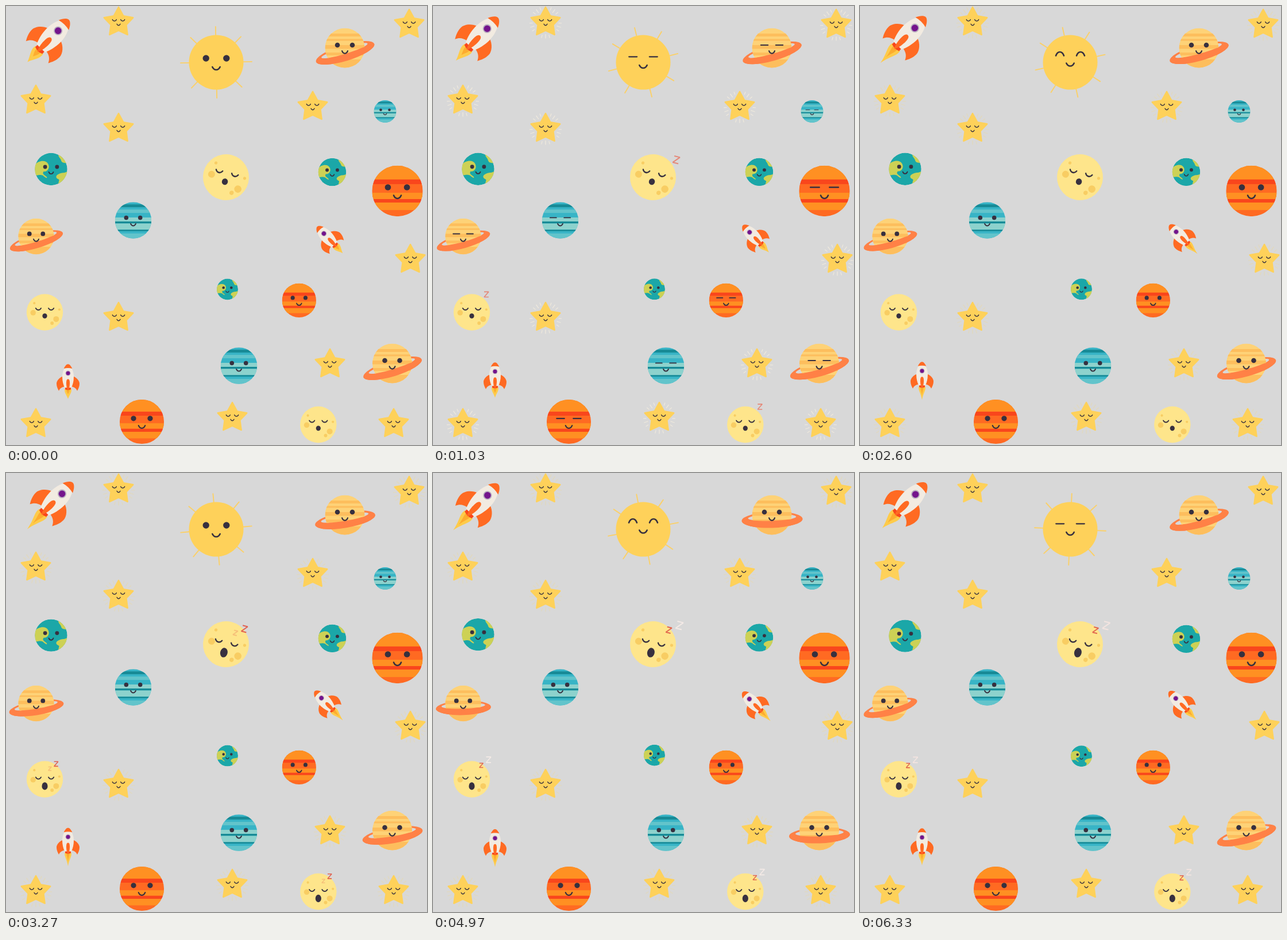
These frames come from a looping animation (733 px wide and 764 px high, 6360 ms). An HTML page with a canvas:

```html
<!DOCTYPE html>
<html lang="en">
<head>
<meta charset="utf-8">
<title>Sleepy sky</title>
<style>
html, body { margin: 0; width: 100%; height: 100%; overflow: hidden; background: #d8d8d8; }
canvas { display: block; }
</style>
</head>
<body>
<canvas id="sky" width="733" height="764"></canvas>
<script>
const ctx = document.getElementById('sky').getContext('2d');
const TAU = Math.PI * 2, DEG = Math.PI / 180, LOOP = 6360;
const INK = '#37303f', GOLD = '#fed15a', FLAME = '#ff6a22', RED = '#f9461c';

const clamp = v => Math.max(0, Math.min(1, v));
const ramp = (v, a, b) => clamp((v - a) / (b - a));
const smooth = v => v * v * (3 - 2 * v);
const tri = v => 1 - Math.abs(1 - 2 * (v % 1));

function at(x, y, scale, turn, draw) {
  ctx.save();
  ctx.translate(x, y);
  ctx.rotate(turn * DEG);
  ctx.scale(scale, scale);
  draw();
  ctx.restore();
}

function oval(x, y, rx, ry, color) {
  ctx.fillStyle = color;
  ctx.beginPath();
  ctx.ellipse(x, y, rx, ry, 0, 0, TAU);
  ctx.fill();
}

const dot = (x, y, r, color) => oval(x, y, r, r, color);

function shape(path, color) {
  ctx.fillStyle = color;
  ctx.fill(new Path2D(path));
}

function line(x1, y1, x2, y2, width, color) {
  ctx.strokeStyle = color;
  ctx.lineWidth = width;
  ctx.lineCap = 'round';
  ctx.beginPath();
  ctx.moveTo(x1, y1);
  ctx.lineTo(x2, y2);
  ctx.stroke();
}

// Shallow curve centred on x; positive depth hangs down
function curve(x, y, half, depth, width) {
  ctx.strokeStyle = INK;
  ctx.lineWidth = width;
  ctx.lineCap = 'round';
  ctx.beginPath();
  ctx.moveTo(x - half, y);
  ctx.bezierCurveTo(x - half * 0.55, y + depth * 1.33, x + half * 0.55, y + depth * 1.33, x + half, y);
  ctx.stroke();
}

function eyes(dx, y, r, shut) {
  for (const x of [-dx, dx]) {
    if (shut) line(x - r * 1.45, y, x + r * 1.45, y, r * 0.48, INK);
    else dot(x, y, r, INK);
  }
}

// Disc with horizontal bands given as [top, bottom, colour]
function globe(r, base, bands) {
  ctx.save();
  ctx.beginPath();
  ctx.arc(0, 0, r, 0, TAU);
  ctx.clip();
  ctx.fillStyle = base;
  ctx.fillRect(-r, -r, 2 * r, 2 * r);
  for (const [top, bottom, color] of bands) {
    ctx.fillStyle = color;
    ctx.fillRect(-r, top, 2 * r, bottom - top);
  }
  ctx.restore();
}

function sun(t) {
  const p = t % 3180;
  const mood = p < 1000 ? 0 : p < 1065 || p >= 3125 ? 1 : 2;
  at(366, 98, 1, -1 - 0.0563 * t, () => {
    for (let i = 0; i < 8; i++) {
      ctx.rotate(TAU / 8);
      line(0, -47, 0, -62, 1.9, '#fbd067');
    }
  });
  at(366, 98, 1, 0, () => {
    dot(0, 0, 47.5, GOLD);
    if (mood === 0) eyes(17.8, -7, 5.7, false);
    if (mood === 1) eyes(17.8, -9.7, 4.8, true);
    if (mood === 2) for (const x of [-18, 18]) curve(x, -11.5, 7, -6.5, 2.6);
    curve(0, [8, 5, 1.5][mood], 6.7, 5, 2.6);
  });
}

function star(x, y, t) {
  const p = t % 1180;
  const bright = p >= 1010 && p < 1150;
  let alpha = 0;
  if (bright) alpha = 0.75;
  else if (p >= 1150 || (t > 1180 && p < 330)) alpha = 0.3;
  else if (t > 25 && p < 200) alpha = 0.25;
  else if (p > 870) alpha = 0.3 * ramp(p, 870, 905);
  at(x, y + 0.5, 1, 0, () => {
    if (alpha) {
      ctx.save();
      ctx.globalAlpha = alpha;
      for (let i = 0; i < 15; i++) {
        const a = (90 + Math.floor(i / 3) * 72 + (i % 3 - 1) * 15) * DEG;
        const r1 = i % 3 === 1 ? 21 : 23;
        line(r1 * Math.cos(a), r1 * Math.sin(a), 27.5 * Math.cos(a), 27.5 * Math.sin(a), 1.3,
          bright ? '#f5eedd' : '#fad97e');
      }
      ctx.restore();
    }
    ctx.beginPath();
    for (let i = 0; i < 10; i++) {
      const a = -TAU / 4 + i * TAU / 10, r = i % 2 ? 14 : 26.5;
      ctx.lineTo(r * Math.cos(a), r * Math.sin(a));
    }
    ctx.closePath();
    ctx.fillStyle = ctx.strokeStyle = GOLD;
    ctx.lineJoin = 'round';
    ctx.lineWidth = 2.6;
    ctx.fill();
    ctx.stroke();
    curve(-7.2, -4.9, 3.5, 2.6, 1.4);
    curve(7.2, -4.9, 3.5, 2.6, 1.4);
    curve(0, 2.8, 3, 2.4, 1.4);
  });
}

function ring(tilt, front) {
  ctx.save();
  ctx.translate(0.5, 8.5);
  ctx.rotate(tilt * DEG);
  if (front) {
    ctx.beginPath();
    ctx.rect(-60, 0, 120, 40);
    ctx.clip();
  }
  ctx.beginPath();
  ctx.ellipse(0, 0, 53, 14, 0, 0, TAU);
  ctx.ellipse(0, -4, 42, 5.8, 0, 0, TAU);
  ctx.fillStyle = '#ff8146';
  ctx.fill('evenodd');
  ctx.restore();
}

function saturn(x, y, k, sway, shut) {
  const tilt = -17 + 16 * sway, band = '#fdbe5d';
  at(x, y, k, 0, () => {
    ring(tilt, false);
    globe(34.5, '#fed277', [[-25, -20, band], [-15.5, -12.5, band], [-5, 1.5, band], [8, 13, band], [20, 35, band]]);
    ring(tilt, true);
    eyes(13, -5, 4.3, shut);
    curve(0, 5.2, 5, 4.4, 2.2);
  });
}

function earth(x, y, r, sway) {
  const k = r / 28;
  at(x, y - 3 * k * sway, k, 0, () => {
    ctx.save();
    ctx.beginPath();
    ctx.arc(0, 0, 28, 0, TAU);
    ctx.clip();
    dot(0, 0, 28, '#1ba7a8');
    const land = '#cdd155';
    shape('M-30-6C-24-14-10-18-5-9C-1-1-8 5-13 4C-16 9-11 10-8 13C-5 17-10 15-14 11C-20 8-25 12-30 10Z', land);
    shape('M13-30C11-21 15-21 17-16C19-8 25-13 30-8L30-30Z', land);
    shape('M30 3C22 8 20 5 14 8C7 11 8 15 12 17C17 19 10 22 14 30L30 28Z', land);
    ctx.restore();
    eyes(10.3, -4, 3.4, false);
    curve(0, 4.8, 4, 3.3, 1.8);
  });
}

function ice(x, y, r, shut) {
  const dark = '#178a96', pale = '#8dd2cd', mid = '#62c4cb';
  at(x, y, r / 32, 0, () => {
    globe(32, '#38b4c6', [[-28, -23, dark], [-19, -13, mid], [-5, 2, pale], [2, 5.5, dark],
      [5.5, 16.5, pale], [16.5, 19, dark], [23, 32, mid]]);
    eyes(12.3, -4.6, 3.8, shut);
    curve(0, 6, 4.5, 3.6, 2);
  });
}

function mars(x, y, r, shut) {
  const amber = '#ff9022';
  at(x, y, r / 44.5, 0, () => {
    globe(44, FLAME, [[-44, -20, amber], [-20, -12, RED], [3, 14, amber], [14, 20, RED], [20, 33, amber]]);
    eyes(16.5, -6.5, 5.3, shut);
    curve(0, 7.5, 6.5, 5.4, 2.6);
  });
}

function zed(x, color, alpha) {
  const s = 3.4 + 0.075 * (x - 10.8);
  const y = -22.8 - (x - 10.8) * 0.77;
  ctx.save();
  ctx.globalAlpha = clamp(alpha);
  ctx.strokeStyle = color;
  ctx.lineWidth = 2;
  ctx.lineCap = 'butt';
  ctx.lineJoin = 'miter';
  ctx.miterLimit = 2;
  ctx.beginPath();
  ctx.moveTo(x - s, y - s * 1.15);
  ctx.lineTo(x + s, y - s * 1.15);
  ctx.lineTo(x - s, y + s * 1.15);
  ctx.lineTo(x + s, y + s * 1.15);
  ctx.stroke();
  ctx.restore();
}

function moon(x, y, r, turn, t) {
  const p = t % 1370;
  const yawn = smooth(ramp(p, 230, 450)) * (1 - smooth(ramp(p, 880, 1010)));
  at(x, y, r / 40, turn, () => {
    dot(0, 0, 40, '#fee58b');
    const pit = '#f8cd63';
    dot(-25.6, 1, 6, pit);
    dot(25, 15, 6.3, pit);
    dot(-23, -20, 2.6, pit);
    dot(32, -6, 2.6, pit);
    dot(16, 24, 3.7, pit);
    const lid = -9 + 4.5 * yawn;
    curve(-14, lid, 5.8, 4, 2.4);
    curve(14, lid, 5.8, 4, 2.4);
    oval(0, 8 + 7 * yawn, 5.2 + 1.2 * yawn, 5.6 + 2.8 * yawn, INK);
    if (p > 200 && p < 930) {
      const px = p < 545 ? 10 + 15.5 * ramp(p, 200, 545) : 25.5 + (p - 545) * 0.036;
      const pale = ramp(p, 640, 860);
      const tone = [224 + 20 * pale, 98 + 136 * pale, 82 + 148 * pale].map(Math.round);
      zed(px, `rgb(${tone})`, ramp(p, 200, 320) * (1 - ramp(p, 870, 930)));
    }
    if (p > 490 && p < 1130) {
      const px = p < 855 ? 10 + 10.5 * ramp(p, 490, 855) : 20.5 + (p - 855) * 0.066;
      zed(px, p > 930 ? '#e8735f' : '#e2684f', ramp(p, 470, 680) * (1 - ramp(p, 980, 1130) * 0.6));
    }
  });
}

function rocket(x, y, k, turn, t) {
  const p = t / 598, lift = 6.2 * Math.pow(tri(p), 1.2);
  const tail = 60.5 + lift + 2 * Math.sin(TAU * p);
  at(x, y, k, turn, () => {
    ctx.translate(0, -lift);
    shape(`M-5.5 43C-7.5 49-2 54 0 ${tail}C2 54 7.5 49 5.5 43Z`, '#fecb4a');
    shape(`M-2.6 43C-3.6 47-1 50 0 ${tail - 8}C1 50 3.6 47 2.6 43Z`, '#fdac2f');
    shape('M-8.5 21C-15 23-20 29-20 34C-20 39-18 43-16 46.5C-14 42-11 40-6 39Z', FLAME);
    shape('M8.5 21C15 23 20 29 20 34C20 39 18 43 16 46.5C14 42 11 40 6 39Z', FLAME);
    shape('M-5 39L5 39L5 44Q0 46-5 44Z', RED);
    shape('M0 0C6 4 10 13 10 22C10 30 8 36 6 41L-6 41C-8 36-10 30-10 22C-10 13-6 4 0 0Z', '#f2ebe1');
    shape('M0 0C2.6 0 5.5 3.5 7.2 7.6Q0 5.6-7.2 7.6C-5.5 3.5-2.6 0 0 0Z', FLAME);
    dot(0, 15.8, 4.5, '#b9aebf');
    dot(0, 15.8, 3.4, '#74148c');
    shape('M0 26C3 26 3.2 31 3 35Q2.6 42 0 46Q-2.6 42-3 35C-3.2 31-3 26 0 26Z', FLAME);
  });
}

const STARS = [[196, 28], [702, 32], [52, 164], [196, 213], [534, 175], [704, 441],
  [196, 542], [564, 623], [52, 727], [394, 716], [675, 727]];

function render(t) {
  const sway = tri(t / 525);
  const blink = t % 2120;
  const shut = blink > 975 && blink < 1095;

  ctx.fillStyle = '#d8d8d8';
  ctx.fillRect(0, 0, 733, 764);

  for (const [x, y] of STARS) star(x, y, t);
  sun(t);

  saturn(590, 73, 1, sway, shut);
  saturn(52.5, 401, 0.905, sway, shut);
  saturn(672.5, 622, 1, sway, shut);

  earth(78.5, 284, 28.2, sway);
  earth(568, 289, 24.3, sway);
  earth(385.5, 493, 18.5, sway);

  ice(221.5, 373, 31.7, shut);
  ice(660, 183.5, 19.5, shut);
  ice(405.5, 626, 31.8, shut);

  mars(681.5, 322, 44.7, shut);
  mars(510.3, 512.3, 30, shut);
  mars(236.5, 723.5, 39, shut);

  moon(383, 298, 40, 14, t);
  moon(67.5, 533, 31.7, 0, t);
  moon(543.8, 728.5, 31.7, 0, t);

  rocket(109.5, 24, 1.7, 44.5, t);
  rocket(541.8, 384, 1.06, -44, t);
  rocket(108, 623.3, 1, 0, t);
}

const start = performance.now();
function tick() {
  render((performance.now() - start) % LOOP);
  requestAnimationFrame(tick);
}
tick();
</script>
</body>
</html>
```
